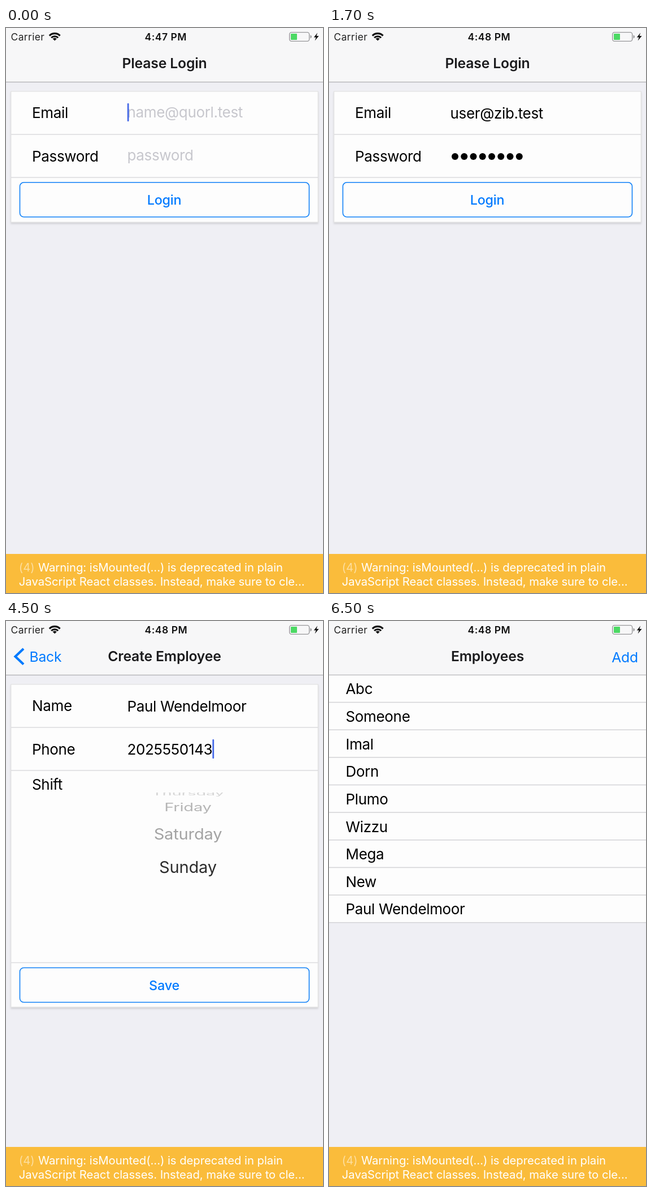
These frames come from a looping animation (561x998 px, 8 s). An HTML page:

```html
<!DOCTYPE html>
<html lang="en">
<head>
<meta charset="utf-8">
<title>Employee manager</title>
<style>
  html, body { margin: 0; width: 100%; height: 100%; overflow: hidden; background: #efeff4; }
  svg { display: block; width: 100%; height: 100%; }
  text {
    font-family: Inter, Roboto, "Liberation Sans", sans-serif;
    font-optical-sizing: none;
    white-space: pre;
  }
  .body { font-size: 26px; letter-spacing: -.013em; fill: #000; }
  .hint { fill: #c7c7cd; }
  .title { font-size: 24.7px; font-weight: 600; letter-spacing: -.006em; text-anchor: middle; fill: #1b1b1d; }
  .nav { font-size: 24.7px; letter-spacing: -.01em; fill: #007aff; }
  .button { font-size: 23.3px; font-weight: 500; letter-spacing: -.008em; text-anchor: middle; fill: #007aff; }
  .wheel { font-size: 29px; letter-spacing: -.005em; text-anchor: middle; }
  .status { font-size: 17.5px; letter-spacing: .02em; fill: #222; }
  .clock { font-weight: 600; letter-spacing: .03em; fill: #111; }
  .warning { font-size: 20.3px; letter-spacing: -.002em; fill: #fff; }
</style>
</head>
<body>
<svg viewBox="0 0 561 998" preserveAspectRatio="none">
  <defs>
    <filter id="shadow" x="-5%" y="-5%" width="110%" height="115%">
      <feDropShadow dx="0" dy="2.5" stdDeviation="1.8" flood-color="#000" flood-opacity=".13"/>
    </filter>
    <clipPath id="wheelWindow"><rect x="200" y="303" width="245" height="260"/></clipPath>
  </defs>
  <rect width="561" height="998" fill="#efeff4"/>
  <g id="screen"></g>

  <g id="statusBar">
    <text class="status" x="8.5" y="22">Carrier</text>
    <g fill="none" stroke="#111" stroke-width="3.1">
      <path d="M76.8 13.6 A13.2 13.2 0 0 1 95.6 13.6"/>
      <path d="M80.2 17.3 A8.3 8.3 0 0 1 92.2 17.3"/>
    </g>
    <path d="M82.6 19 A5 5 0 0 1 89.8 19 L86.2 22.6 Z" fill="#111"/>
    <text id="clock" class="status clock" x="245.5" y="22"></text>
    <rect x="501.7" y="7.6" width="35" height="15.8" rx="3.6" fill="none" stroke="#98989a" stroke-width="1.4"/>
    <rect x="504" y="10" width="11" height="11" rx="1" fill="#4cd964"/>
    <path d="M538.5 12.6 Q541 13.2 541 15.5 Q541 17.8 538.5 18.4 Z" fill="#98989a"/>
    <path d="M551.2 8.5 L544.8 16.4 H548.6 L546.6 22.5 L553.6 14.1 H549.5 Z" fill="#111"/>
  </g>

  <g id="banner">
    <rect y="929" width="561" height="69" fill="#fabc3b"/>
    <text class="warning" x="22.8" y="960"><tspan fill-opacity=".5">(4)</tspan></text>
    <text class="warning" x="57" y="960">Warning: isMounted(...) is deprecated in plain</text>
    <text class="warning" x="22.8" y="985">JavaScript React classes. Instead, make sure to cle...</text>
  </g>
</svg>

<script>
const LOOP = 8000;
const PEOPLE = ['Abc', 'Someone', 'Imal', 'Dorn', 'Plumo', 'Wizzu', 'Mega', 'New'];
const NEW_PERSON = 'Paul Wendelmoor';
const FIELD_X = 214.5;

const screen = document.getElementById('screen');
const clock = document.getElementById('clock');

const text = (cls, x, y, str, attrs = '') =>
  `<text class="${cls}" x="${x}" y="${y}" ${attrs}>${str}</text>`;
const rule = (x, y, w, color) =>
  `<rect x="${x}" y="${y - .75}" width="${w}" height="1.5" fill="${color}"/>`;
const caret = (x, y, h) =>
  `<rect class="caret" x="${x}" y="${y}" width="2.8" height="${h}" rx="1" fill="#4569e8"/>`;

function header(title, { back = false, backLabel = '', action = '' } = {}) {
  return '<rect width="561" height="95" fill="#f7f7f8"/>' +
    rule(0, 95.5, 561, '#b8b8bb') +
    text('title', 280.5, 71, title) +
    (back ? '<path d="M31 49 L16.5 62.8 L31 76.6" fill="none" stroke="#007aff" stroke-width="4.2"/>' : '') +
    text('nav', 41.5, 72, backLabel) +
    text('nav', 546.8, 73, action, 'text-anchor="end"');
}

function card(bottom, lines) {
  return `<rect x="8.8" y="112" width="543.4" height="${bottom - 112}" fill="#fdfdfd" stroke="#ddd" filter="url(#shadow)"/>` +
    lines.map(y => rule(9, y, 543, '#dcdcde')).join('');
}

const label = (y, str) => text('body', 46, y, str);

const button = (y, str) =>
  `<rect x="24.5" y="${y}" width="512" height="61" rx="7" fill="none" stroke="#0f80f7" stroke-width="1.6"/>` +
  text('button', 280, y + 39.2, str);

function login(fields) {
  return header('Please Login') + card(343, [188, 264]) +
    label(159, 'Email') + label(235.5, 'Password') + fields + button(272.8, 'Login');
}

function emptyLogin() {
  return login(
    text('body hint', FIELD_X, 158, 'name@quorl.test') +
    text('body hint', FIELD_X, 234, 'password') +
    caret(214.7, 133, 32));
}

function filledLogin() {
  let dots = '';
  for (let i = 0; i < 8; i++) dots += `<circle cx="${223 + i * 16.25}" cy="227" r="6"/>`;
  return login(text('body', FIELD_X, 160, 'user@zib.test') + dots);
}

function list(names, back) {
  const pitch = 48.63;
  return header('Employees', { back, action: 'Add' }) +
    `<rect y="96" width="561" height="${names.length * pitch - 1}" fill="#fdfdfd"/>` +
    names.map((name, i) =>
      text('body', 29.5, 129.4 + i * pitch, name) +
      rule(0, 95 + (i + 1) * pitch, 561, '#d3d3d6')).join('');
}

function wheelItem(day, y, squash, color) {
  return text('wheel', 0, 0, day, `fill="${color}" transform="translate(322 ${y}) scale(1 ${squash})"`);
}

function createEmployee() {
  return header('Create Employee', { back: true, backLabel: 'Back' }) +
    card(682, [188, 264, 603.5]) +
    label(159, 'Name') + label(235.5, 'Phone') + label(298, 'Shift') +
    text('body', FIELD_X, 160, NEW_PERSON) +
    text('body', FIELD_X, 236, '2025550143', 'id="phone"') +
    caret(369.7, 209, 34) +
    '<g clip-path="url(#wheelWindow)">' +
    wheelItem('Thursday', 308, .32, '#d6d6d6') +
    wheelItem('Friday', 336, .7, '#b5b5b5') +
    wheelItem('Saturday', 386, .92, '#a3a3a3') +
    wheelItem('Sunday', 445, 1, '#2d2d2d') +
    '</g>' +
    button(612.5, 'Save');
}

const scenes = [
  { start: 0, time: '4:47 PM', draw: emptyLogin },
  { start: 500, time: '4:48 PM', draw: filledLogin },
  { start: 2500, time: '4:48 PM', draw: () => list(PEOPLE, true) },
  { start: 4500, time: '4:48 PM', draw: createEmployee },
  { start: 6500, time: '4:48 PM', draw: () => list([...PEOPLE, NEW_PERSON], false) }
];

let current = null;

function render(t) {
  const scene = scenes.findLast(s => t >= s.start);
  if (scene === current) return;
  current = scene;
  clock.textContent = scene.time;
  screen.innerHTML = scene.draw();
  // The caret sits right after the typed digits.
  const phone = document.getElementById('phone');
  if (phone) screen.querySelector('.caret').setAttribute('x', FIELD_X + phone.getComputedTextLength());
}

const origin = performance.now();
function tick() {
  render((performance.now() - origin) % LOOP);
  requestAnimationFrame(tick);
}
tick();
</script>
</body>
</html>
```
